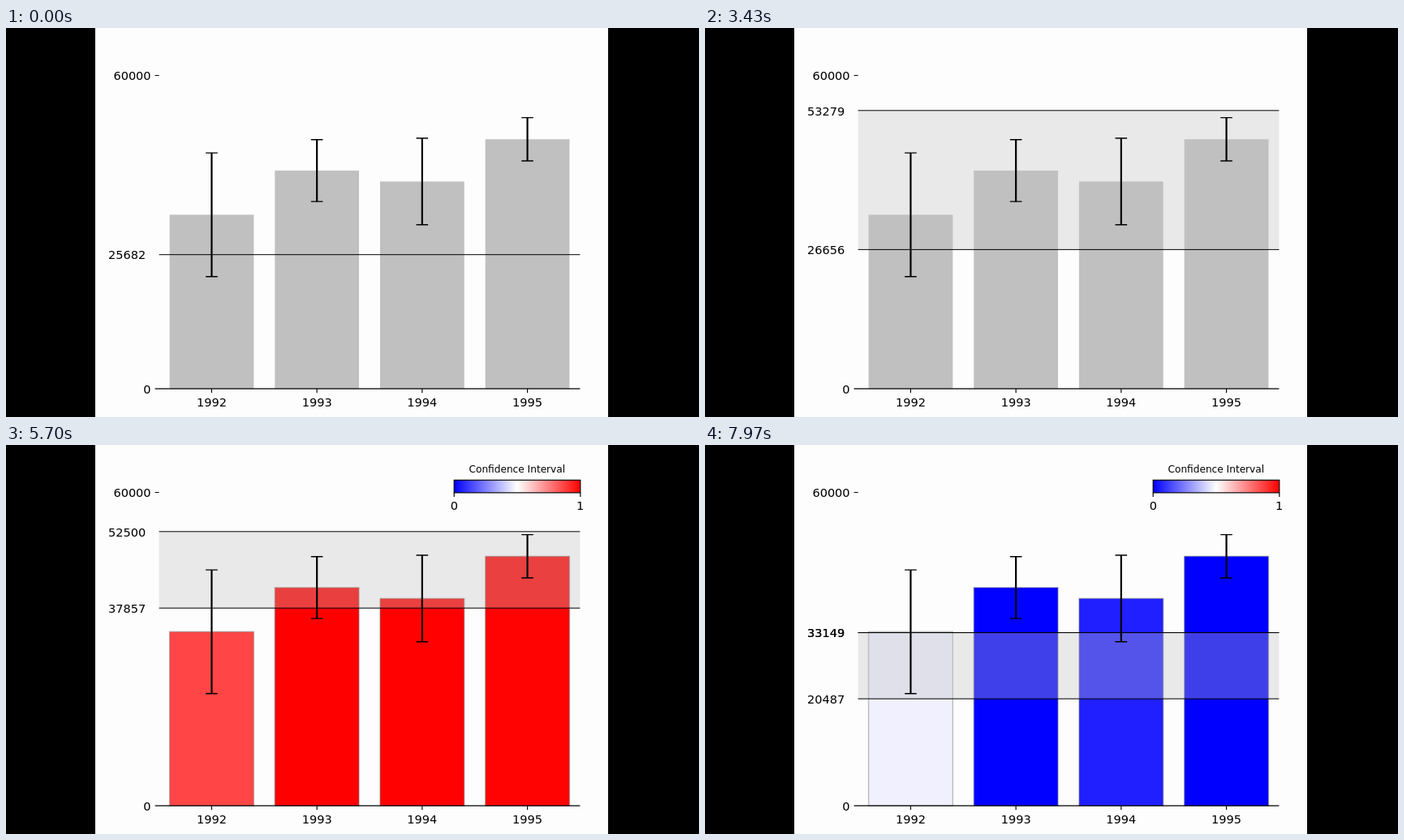
An HTML page that plays this animation: 854 px wide and 480 px high, repeating every 8 s.

```html
<!DOCTYPE html>
<html lang="en">
<head>
<meta charset="utf-8">
<title>Interval picker bar chart</title>
<style>
  html, body { margin: 0; width: 100%; height: 100%; overflow: hidden; background: #000; }
  svg { display: block; width: 100%; height: 100%; }
  text { font: 14.53px "DejaVu Sans", sans-serif; fill: #000; }
  .title { font-size: 12.15px; }
</style>
</head>
<body>
<svg id="stage" viewBox="0 0 854 480"></svg>
<script>
const LOOP = 8000, FPS = 30;
const LEFT = 188.6, RIGHT = 707.4, BASE = 445.2, TOP = 58.5, MAX = 60000;
const STEP = (RIGHT - LEFT) / 4, BAR_W = STEP * 0.8;
const GRAY = '#c0c0c0';

// Bar top and error half-height, in pixels
const BARS = [
  { year: 1992, top: 230.4, err: 76.3 },
  { year: 1993, top: 175.9, err: 38.2 },
  { year: 1994, top: 189.4, err: 53.4 },
  { year: 1995, top: 137.3, err: 26.7 }
];

// Pointer path: [frame, value]
const PATH = [
  [0, 25682], [14, 15000], [31, 32662], [41, 59800], [51, 45600],
  [62, 26656], [65, 27955], [76, 45600], [87, 59000], [100, 53279],
  [108, 53279], [126, 57200], [148, 37857], [149, 37857], [151, 41429],
  [159, 59000], [166, 52500], [171, 52500], [174, 52690], [203, 52690],
  [204, 52792], [224, 20487], [234, 33149], [240, 33149]
];
const CLICKS = [62, 108, 149, 191, 224, 235];

const stage = document.getElementById('stage');

function add(tag, attrs, parent = stage) {
  const el = document.createElementNS('http://www.w3.org/2000/svg', tag);
  set(el, attrs);
  parent.appendChild(el);
  return el;
}
function set(el, attrs) {
  for (const k in attrs) el.setAttribute(k, attrs[k]);
}
function label(str, x, y, anchor, cls = '') {
  const el = add('text', { x, y, 'text-anchor': anchor, class: cls });
  el.textContent = str;
  return el;
}
function stroke(d, width) {
  return add('path', { d, fill: 'none', stroke: '#000', 'stroke-width': width });
}

const toY = v => BASE - v / MAX * (BASE - TOP);
const toValue = y => (BASE - y) / (BASE - TOP) * MAX;

// Blue through white to red
function colorAt(p) {
  const lo = Math.round(255 * Math.min(1, 2 * p));
  const hi = Math.round(255 * Math.min(1, 2 - 2 * p));
  return `rgb(${lo},${Math.min(lo, hi)},${hi})`;
}

// Normal distribution, logistic approximation
const cdf = z => 1 / (1 + Math.exp(-1.5976 * z - 0.07056 * z ** 3));

function share(bar, a, b) {
  const mean = toValue(bar.top);
  const sd = bar.err / (BASE - TOP) * MAX / 1.96;
  const p = cdf((Math.max(a, b) - mean) / sd) - cdf((Math.min(a, b) - mean) / sd);
  return Math.min(1, Math.max(0, p));
}

// Monotone cubic through PATH
const secant = i => (PATH[i + 1][1] - PATH[i][1]) / (PATH[i + 1][0] - PATH[i][0]);
function slope(i) {
  if (i === 0 || i === PATH.length - 1) return 0;
  const a = secant(i - 1), b = secant(i);
  return a * b > 0 ? 2 * a * b / (a + b) : 0;
}
function pointer(n) {
  let i = 0;
  while (i < PATH.length - 2 && n >= PATH[i + 1][0]) i++;
  const [n0, v0] = PATH[i], [n1, v1] = PATH[i + 1];
  const h = n1 - n0, u = (n - n0) / h, w = 1 - u;
  return v0 * (1 + 2 * u) * w * w + v1 * u * u * (3 - 2 * u)
    + h * u * w * (slope(i) * w - slope(i + 1) * u);
}

add('rect', { width: 854, height: 480, fill: '#000' });
add('rect', { x: 110, width: 632, height: 480, fill: '#fdfdfd' });

const plot = add('g', {});
const band = add('rect', { x: LEFT, width: RIGHT - LEFT, fill: '#bebebe', 'fill-opacity': 0.33 }, plot);
const barGroup = add('g', { stroke: '#808080', 'stroke-opacity': 0.5 }, plot);
const bars = BARS.map((b, i) => add('rect', {
  x: LEFT + STEP * (i + 0.1), y: b.top, width: BAR_W, height: BASE - b.top
}, barGroup));

BARS.forEach((b, i) => {
  const x = LEFT + STEP * (i + 0.5), y0 = b.top - b.err, y1 = b.top + b.err;
  stroke(`M${x} ${y0}V${y1}`, 2.18);
  stroke(`M${x - 7.3} ${y0}h14.6M${x - 7.3} ${y1}h14.6`, 1.45);
  stroke(`M${x} ${BASE}v5`, 1.16);
  label(b.year, x, 466.7, 'middle');
});
stroke(`M${LEFT - 5} ${BASE}H${RIGHT}M${LEFT - 5} ${TOP}h5`, 1.16);
label('60000', 178.6, 64, 'end');
label('0', 178.6, 450.7, 'end');

// Lines: first click, second click, pointer, pointer left behind by a click
const markers = [0, 1, 2, 3].map(() => ({
  line: stroke('', 1),
  text: label('', 172.3, 0, 'end')
}));
function mark(m, value) {
  const shown = value !== null;
  m.line.style.display = m.text.style.display = shown ? '' : 'none';
  if (!shown) return;
  const y = toY(value);
  set(m.line, { d: `M${LEFT} ${y}H${RIGHT}` });
  set(m.text, { y: y + 5.7 });
  m.text.textContent = Math.round(value);
}

const grad = add('linearGradient', { id: 'scale' }, add('defs', {}));
[0, 0.5, 1].forEach(p => add('stop', { offset: p, 'stop-color': colorAt(p) }, grad));
const legend = add('g', {});
[
  add('rect', { x: 552.2, y: 43.3, width: 155.6, height: 15.6, fill: 'url(#scale)', stroke: '#000', 'stroke-width': 1.16 }),
  stroke('M552.2 59v5M707.8 59v5', 1.16),
  label('0', 552.4, 79.7, 'middle'),
  label('1', 707.6, 79.7, 'middle'),
  label('Confidence Interval', 629.8, 33.6, 'middle', 'title')
].forEach(el => legend.appendChild(el));

function draw(t) {
  const n = Math.floor(t * FPS / 1000 + 0.12);
  const now = pointer(n);
  const done = CLICKS.filter(c => c <= n);
  const k = done.length, open = k % 2 === 1;
  const picked = i => pointer(CLICKS[i]);
  const a = k ? picked(open ? k - 1 : k - 2) : null;
  const b = k && !open ? picked(k - 1) : null;
  const lingering = open && n - done[k - 1] < 3;

  [a, b, now, lingering ? a : null].forEach((v, i) => mark(markers[i], v));

  band.style.display = k ? '' : 'none';
  if (k) {
    const y0 = toY(a), y1 = toY(open ? now : b);
    set(band, { y: Math.min(y0, y1), height: Math.abs(y1 - y0) });
  }

  const pairs = k >> 1;
  legend.style.display = pairs ? '' : 'none';
  // The band covers the bars only once they are coloured
  const last = pairs ? band : barGroup;
  if (plot.lastChild !== last) plot.appendChild(last);
  set(barGroup, { 'stroke-width': pairs ? 1.4 : 0 });
  bars.forEach((el, i) => {
    const fill = pairs
      ? colorAt(share(BARS[i], picked(pairs * 2 - 2), picked(pairs * 2 - 1)))
      : GRAY;
    set(el, { fill });
  });
}

const start = performance.now();
function tick() {
  draw((performance.now() - start) % LOOP);
  requestAnimationFrame(tick);
}
draw(0);
requestAnimationFrame(tick);
</script>
</body>
</html>
```
